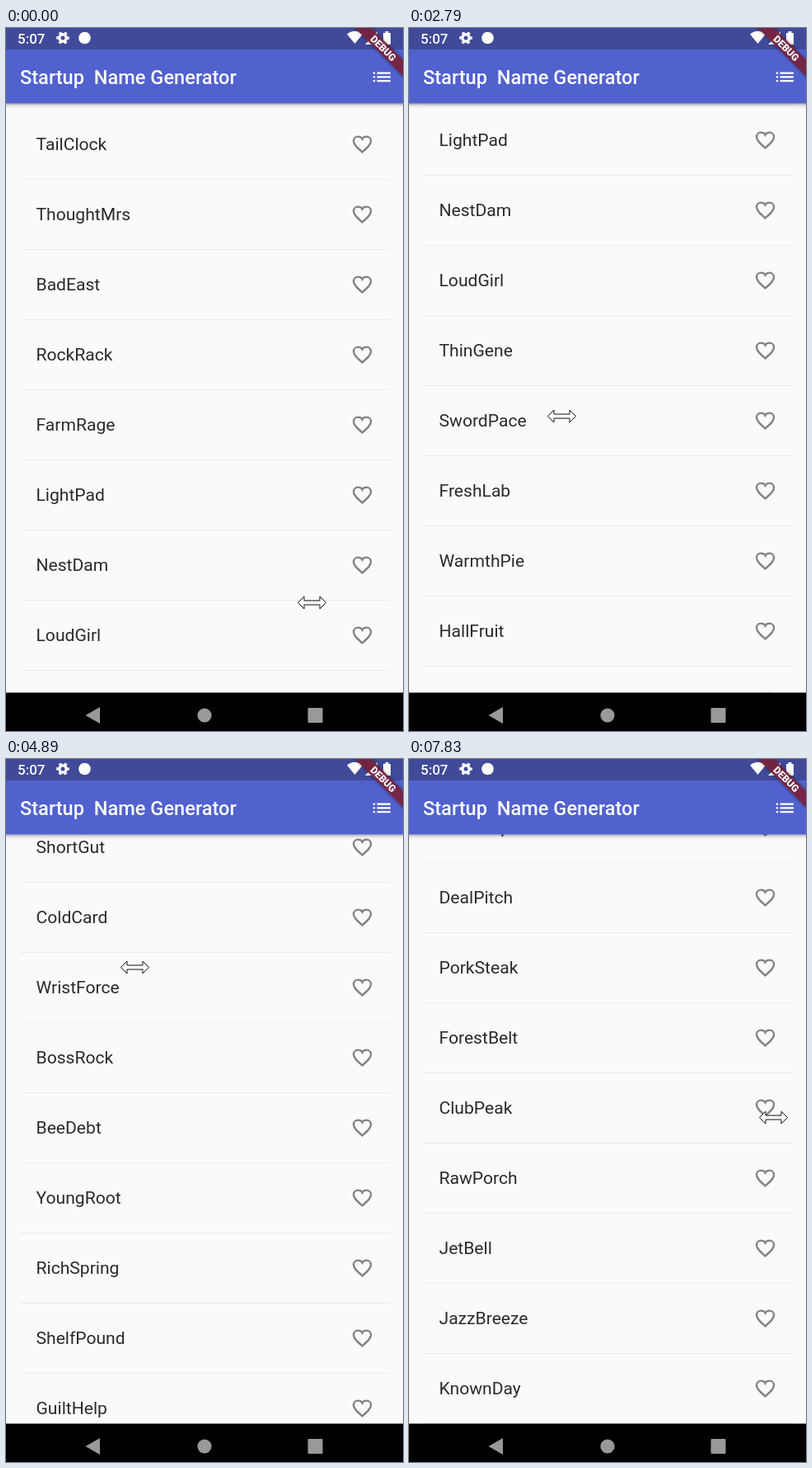
These frames come from a looping animation (482 px wide and 852 px high, 8000 ms). An HTML page:

```html
<!DOCTYPE html>
<html lang="en">
<head>
<meta charset="utf-8">
<title>Startup Name Generator</title>
<style>
  html, body { margin: 0; width: 100%; height: 100%; overflow: hidden; background: #fafafa; }
  svg { display: block; width: 482px; height: 852px; font-family: Roboto, sans-serif; }
  text { white-space: pre; }
  .row text { font-size: 21.1px; fill: #2a2a2a; }
  .row rect { fill: #ebebeb; }
  .row use { fill: none; stroke: #828282; stroke-width: 2; }
</style>
</head>
<body>
<svg viewBox="0 0 482 852">
  <defs>
    <path id="heart" d="M12 20C6.3 14.9 3 12 3 8.5C3 6 4.9 4 7.5 4C9.4 4 11.3 4.9 12 6.4C12.7 4.9 14.6 4 16.5 4C19.1 4 21 6 21 8.5C21 12 17.7 14.9 12 20Z"/>
    <linearGradient id="shade" x2="0" y2="1">
      <stop stop-opacity=".34"/>
      <stop offset=".4" stop-opacity=".1"/>
      <stop offset="1" stop-opacity="0"/>
    </linearGradient>
    <filter id="blur" x="-20%" y="-100%" width="140%" height="300%"><feGaussianBlur stdDeviation="2"/></filter>
  </defs>

  <rect width="482" height="852" fill="#fafafa"/>
  <g id="list"></g>

  <rect y="91.5" width="482" height="6" fill="url(#shade)"/>
  <rect y="26" width="482" height="65.5" fill="#5161ce"/>
  <rect width="482" height="26" fill="#404a99"/>
  <text x="17" y="68" font-size="23.6" font-weight="500" fill="#fff">Startup  Name Generator</text>
  <path d="M445.8 54.7h2.4m2.3 0h16.4M445.8 59.4h2.4m2.3 0h16.4M445.8 64.1h2.4m2.3 0h16.4" stroke="#fff" stroke-width="2.3"/>

  <g fill="#fff">
    <text x="14" y="18.5" font-size="17" font-weight="500">5:07</text>
    <circle cx="69" cy="12" r="4.2" fill="none" stroke="#fff" stroke-width="3.4"/>
    <circle cx="69" cy="12" r="6.6" fill="none" stroke="#fff" stroke-width="2.4" stroke-dasharray="3.5 3.41" stroke-dashoffset="1.75"/>
    <circle cx="95.5" cy="12" r="7.3"/>
    <path d="M414 7.5Q423.5 0 433 7.5L423.5 19Z"/>
    <path d="M436 20L451 4V20Z"/>
    <path d="M458 6H460.5V4H464.5V6H467V20H458Z"/>
  </g>

  <g transform="translate(458 24.5) rotate(45)">
    <rect x="-47" y="-7" width="94" height="14" opacity=".4" filter="url(#blur)"/>
    <rect x="-47" y="-7" width="94" height="14" fill="#7a2440" fill-opacity=".9"/>
    <text y="4.2" font-size="12" font-weight="900" fill="#fff" text-anchor="middle">DEBUG</text>
  </g>

  <rect y="805.5" width="482" height="47"/>
  <g fill="#999">
    <path d="M96.5 833L114 823V843Z"/>
    <circle cx="241" cy="833" r="8.6"/>
    <rect x="366.5" y="824" width="18" height="18" rx="1"/>
  </g>

  <g id="pointer">
    <path d="M-17 0L-9.5 -7.5V-2.5H9.5V-7.5L17 0L9.5 7.5V2.5H-9.5V7.5Z" fill="#fff" stroke="#111"/>
    <circle id="touch" r="18" fill="#ff0" fill-opacity=".52"/>
  </g>
</svg>
<script>
const LOOP = 8000, PITCH = 85;
const SWIPE_MS = 270, COAST_MS = 620;
const LOW = { x: 185, y: 471 }, HIGH = { x: 156, y: 250 };

const names = `TailClock ThoughtMrs BadEast RockRack FarmRage LightPad NestDam LoudGirl
  ThinGene SwordPace FreshLab WarmthPie HallFruit WeedRoof ShortGut ColdCard WristForce
  BossRock BeeDebt YoungRoot RichSpring ShelfPound GuiltHelp DealPitch PorkSteak ForestBelt
  ClubPeak RawPorch JetBell JazzBreeze KnownDay`.split(/\s+/);

const swipes = [
  { press: 1850, coast: 209 }, { press: 2792, coast: 54 }, { press: 3727, coast: 54 },
  { press: 4500, coast: 48 }, { press: 5400, coast: 100 }, { press: 6438, coast: 137 }
];

const clamp = v => Math.min(1, Math.max(0, v));
const mix = (a, b, p) => a + (b - a) * p;
const linear = p => p;
const linger = p => p ** 3;
const coastOut = p => 1 - (1 - p) ** 3;
const smooth = p => p * p * (3 - 2 * p);

const move = (start, end, to, easeY = linear, easeX = easeY) => ({ start, end, to, easeX, easeY });

// Glide in, swipe upwards again and again with a slow return between, then leave.
const moves = [move(40, 1310, { x: 197, y: 169 }, linear, p => smooth(clamp(p * 1.25)))];
let free = 1540;
for (const { press } of swipes) {
  moves.push(move(free, press, LOW, linger), move(press, press + SWIPE_MS, HIGH));
  free = press + SWIPE_MS;
}
moves.push(move(free, 7340, { x: 378, y: 503 }, smooth), move(7340, 7830, { x: 442, y: 434 }));

function pointerAt(t) {
  return moves.reduce((at, { start, end, to, easeX, easeY }) => {
    const p = clamp((t - start) / (end - start));
    return { x: mix(at.x, to.x, easeX(p)), y: mix(at.y, to.y, easeY(p)) };
  }, { x: 371, y: 696 });
}

function scrollAt(t) {
  return swipes.reduce((sum, { press, coast }) => {
    const drag = clamp((t - press) / SWIPE_MS);
    const slide = coastOut(clamp((t - press - SWIPE_MS) / COAST_MS));
    return sum + (LOW.y - HIGH.y) * drag + coast * slide;
  }, 0);
}

const byId = id => document.getElementById(id);
const list = byId('list'), pointer = byId('pointer'), touch = byId('touch');

list.innerHTML = names.map((name, i) => `
  <g class="row" transform="translate(0 ${i * PITCH})">
    <text x="36.5" y="148">${name}</text>
    <use href="#heart" transform="translate(418.5 127) scale(1.17)"/>
    <rect x="17.5" y="183" width="448" height="1"/>
  </g>`).join('');

function draw() {
  const t = performance.now() % LOOP;
  const { x, y } = pointerAt(t);
  const pressed = swipes.some(({ press }) => t >= press && t < press + SWIPE_MS);
  list.setAttribute('transform', `translate(0 ${-Math.round(scrollAt(t))})`);
  pointer.setAttribute('transform', `translate(${Math.round(x) + .5} ${Math.round(y) + .5})`);
  touch.setAttribute('visibility', pressed ? 'visible' : 'hidden');
  requestAnimationFrame(draw);
}
draw();
</script>
</body>
</html>
```
